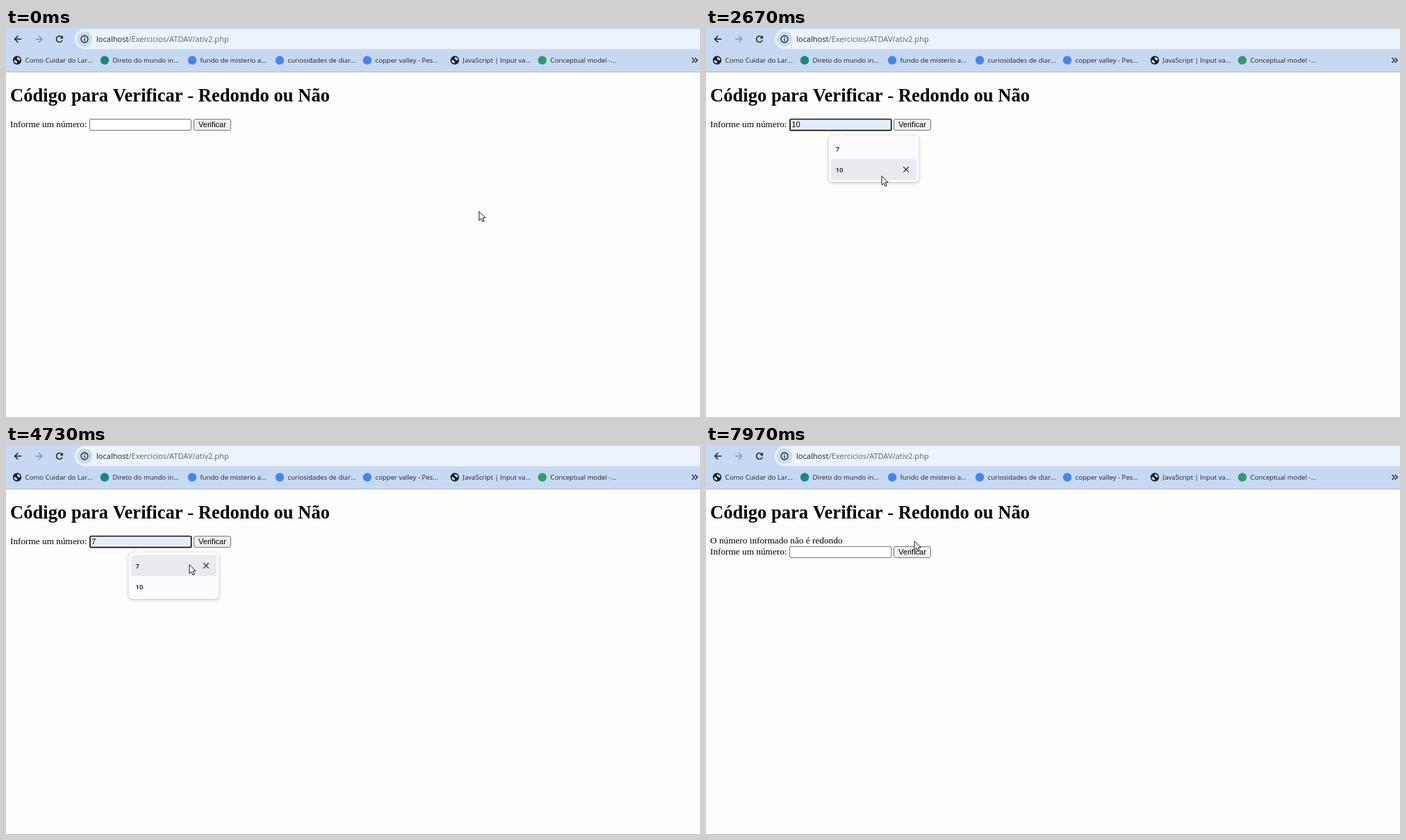
An HTML page with a canvas for the animation above (8000 ms loop, 999 px wide and 561 px high).

```html
<!DOCTYPE html>
<html lang="pt">
<head>
<meta charset="utf-8">
<title>Redondo ou Não</title>
<style>
html, body { margin: 0; width: 100%; height: 100%; overflow: hidden; background: #fdfdfb; }
canvas { display: block; width: 999px; height: 561px; }
</style>
</head>
<body>
<canvas id="stage"></canvas>
<script>
const W = 999, H = 561, LOOP = 8000;
const CLICK = 1740, OPEN = 1800, PICK = 6380, SUBMIT = 7740, BLINK = 530;
const UI = '"Open Sans", sans-serif';
const SERIF = '"Liberation Serif", serif';
const SANS = '"Liberation Sans", sans-serif';
const INK = '#1f2126';

// where the pointer comes to rest: time, x, y
const stops = [
  [0, 681, 264], [630, 601, 277], [1100, 196, 139], [1980, 196, 139],
  [2600, 252, 214], [3300, 275, 187], [3900, 270, 213], [4650, 264, 172],
  [6070, 255, 179], [6680, 255, 180], [7300, 300, 138]
];

const bookmarks = [
  ['globe', 'Como Cuidar do Lar...'],
  ['#168a78', 'Direto do mundo in...'],
  ['#4285f4', 'fundo de misterio a...'],
  ['#4285f4', 'curiosidades de diar...'],
  ['#4285f4', 'copper valley - Pes...'],
  ['globe', 'JavaScript | Input va...'],
  ['#2f9e6b', 'Conceptual model -...']
];
const options = ['7', '10'];

const canvas = document.getElementById('stage');
const dpr = window.devicePixelRatio || 1;
canvas.width = W * dpr;
canvas.height = H * dpr;
const c = canvas.getContext('2d');

function text(str, x, y, font, color = '#000') {
  c.font = font;
  c.fillStyle = color;
  c.fillText(str, x, y);
}

function box(x, y, w, h, r, fill, stroke, line = 1) {
  c.beginPath();
  c.roundRect(x, y, w, h, r);
  c.fillStyle = fill;
  c.fill();
  if (!stroke) return;
  c.strokeStyle = stroke;
  c.lineWidth = line;
  c.stroke();
}

function disc(x, y, r, fill) {
  c.beginPath();
  c.arc(x, y, r, 0, Math.PI * 2);
  c.fillStyle = fill;
  c.fill();
}

function ring(x, y, r, width, from = 0, to = Math.PI * 2) {
  c.beginPath();
  c.arc(x, y, r, from, to);
  c.strokeStyle = INK;
  c.lineWidth = width;
  c.stroke();
}

function line(color, width, ...points) {
  c.beginPath();
  for (const [x, y] of points) c.lineTo(x, y);
  c.strokeStyle = color;
  c.lineWidth = width;
  c.stroke();
}

function shape(fill, ...points) {
  c.beginPath();
  for (const [x, y] of points) c.lineTo(x, y);
  c.closePath();
  c.fillStyle = fill;
  c.fill();
}

// an angle bracket with its tip at x, y; size is negative when it points right
function chevron(x, y, size, color, width) {
  const rise = Math.abs(size);
  line(color, width, [x + size, y - rise], [x, y], [x + size, y + rise]);
}

function arrow(x, dir, color) {
  line(color, 1.5, [x - 4.8, 16], [x + 4.8, 16]);
  chevron(x + 4.8 * dir, 16, -4.6 * dir, color, 1.5);
}

function globe(x, y) {
  disc(x, y, 6.2, INK);
  for (const side of [-1, 1]) {
    c.beginPath();
    c.ellipse(x + side * 2.2, y - side * 2, 2.7, 1.6, 0.6, 0, Math.PI * 2);
    c.fillStyle = '#d5e2f6';
    c.fill();
  }
}

function drawToolbar() {
  c.fillStyle = '#c7d9f2';
  c.fillRect(0, 0, W, 63);
  c.fillStyle = '#a9bbd3';
  c.fillRect(0, 63, W, 1);
  box(99, 1.5, 920, 29, 14.5, '#ebf3fb');

  arrow(17.5, -1, INK);
  arrow(47, 1, '#8793a6');
  ring(77, 16, 4.4, 1.5, 0.35, Math.PI * 2 - 0.75);
  shape(INK, [82, 10.8], [82, 15.2], [77.6, 15.2]);

  disc(113, 16, 11, '#c9daf3');
  ring(113, 16, 5, 1.3);
  line(INK, 1.3, [113, 15.2], [113, 18.8]);
  line(INK, 1.3, [113, 13], [113, 14.2]);

  const font = '11.1px ' + UI;
  text('localhost', 130, 20, font, INK);
  text('/Exercicios/ATDAV/ativ2.php', 130 + c.measureText('localhost').width, 20, font, '#5c6470');

  bookmarks.forEach(([icon, label], i) => {
    const x = 16 + i * 126;
    if (icon === 'globe') globe(x, 46.5);
    else disc(x, 46.5, 6.2, icon);
    text(label, x + 11.6, 50, '9.6px ' + UI, INK);
  });
  for (const x of [991, 995.3]) chevron(x, 46.5, -3.5, INK, 1.4);
}

function drawForm(y, value, focused, filled, caretX) {
  const font = '11.07px ' + SANS;
  text('Informe um número:', 6, y + 12, '13.28px ' + SERIF);
  const fill = filled ? '#e5eefb' : '#fff';
  if (focused) box(121, y + 0.5, 145.7, 16.2, 1.5, fill, '#101010', 1.7);
  else box(120.5, y + 0.5, 146, 16, 1.5, fill, '#767676');
  text(value, 123.3, y + 12, font);
  if (caretX) {
    c.fillStyle = '#000';
    c.fillRect(caretX, y + 3, 1, 12);
  }
  box(270.5, y + 0.5, 53, 16, 2.5, '#efefef', '#767676');
  text('Verificar', 277, y + 12, font);
}

function drawPopup(hover) {
  const fill = '#fcfaff';
  const notch = [[187, 155.5], [193.5, 149.5], [200, 155.5]];
  c.save();
  c.shadowColor = 'rgba(40, 35, 60, 0.32)';
  c.shadowBlur = 4 * dpr;
  c.shadowOffsetY = dpr;
  box(176.5, 155, 130, 67, 6, fill);
  c.restore();
  shape(fill, ...notch);
  line('#eeebf3', 0.8, ...notch);
  options.forEach((label, i) => {
    const y = 159 + i * 30;
    if (i === hover) {
      box(180, y, 123, 30, 3.5, '#ebe9f0');
      chevron(288, y + 15, 3.8, '#3c3b42', 1.4);
      chevron(288, y + 15, -3.8, '#3c3b42', 1.4);
    }
    text(label, 186.5, y + 19, '600 9.6px ' + UI, '#111');
  });
}

function pointerAt(t) {
  const i = stops.findIndex(s => s[0] > t);
  if (i < 0) return stops[stops.length - 1].slice(1);
  const [t0, x0, y0] = stops[i - 1], [t1, x1, y1] = stops[i];
  const k = (t - t0) / (t1 - t0);
  const e = k * k * (3 - 2 * k);
  return [x0 + (x1 - x0) * e, y0 + (y1 - y0) * e];
}

function drawPointer(x, y, beam) {
  c.save();
  c.translate(Math.round(x), Math.round(y));
  if (beam) {
    line('#000', 1.4, [0, -6], [0, 6]);
    for (const end of [-6, 6]) line('#000', 1.2, [-2.7, end], [2.7, end]);
  } else {
    shape('#fff', [0, 0.5], [0, 13.5], [3, 10.8], [5, 15.3], [7.2, 14.4], [5.2, 10], [9.2, 9.7]);
    c.strokeStyle = '#111';
    c.lineWidth = 1;
    c.stroke();
  }
  c.restore();
}

function draw(t) {
  c.setTransform(dpr, 0, 0, dpr, 0, 0);
  c.fillStyle = '#fdfdfb';
  c.fillRect(0, 0, W, H);
  drawToolbar();
  text('Código para Verificar - Redondo ou Não', 6, 106, 'bold 26.6px ' + SERIF);

  const [x, y] = pointerAt(t);
  const sent = t >= SUBMIT;
  const focused = t >= CLICK && !sent;
  const open = t >= OPEN && t < PICK;
  const picked = t >= PICK && !sent;
  const overList = open && x > 180 && x < 303 && y >= 159 && y < 219;
  const hover = overList ? Math.floor((y - 159) / 30) : -1;
  const value = picked ? options[0] : options[hover] || '';

  const since = t - (picked ? PICK : CLICK);
  const caretOn = focused && Math.floor(since / BLINK) % 2 === 0;
  const caretX = caretOn ? (picked ? 130 : 123) : 0;

  if (sent) text('O número informado não é redondo', 6, 142.4, '13.28px ' + SERIF);
  drawForm(sent ? 146 : 131, value, focused, value !== '', caretX);
  if (open) drawPopup(hover);

  const beam = x > 120 && x < 267 && y > 131 && y < 148;
  drawPointer(x, y, beam);
}

const start = performance.now();
function tick() {
  draw((performance.now() - start) % LOOP);
  requestAnimationFrame(tick);
}
tick();
</script>
</body>
</html>
```
